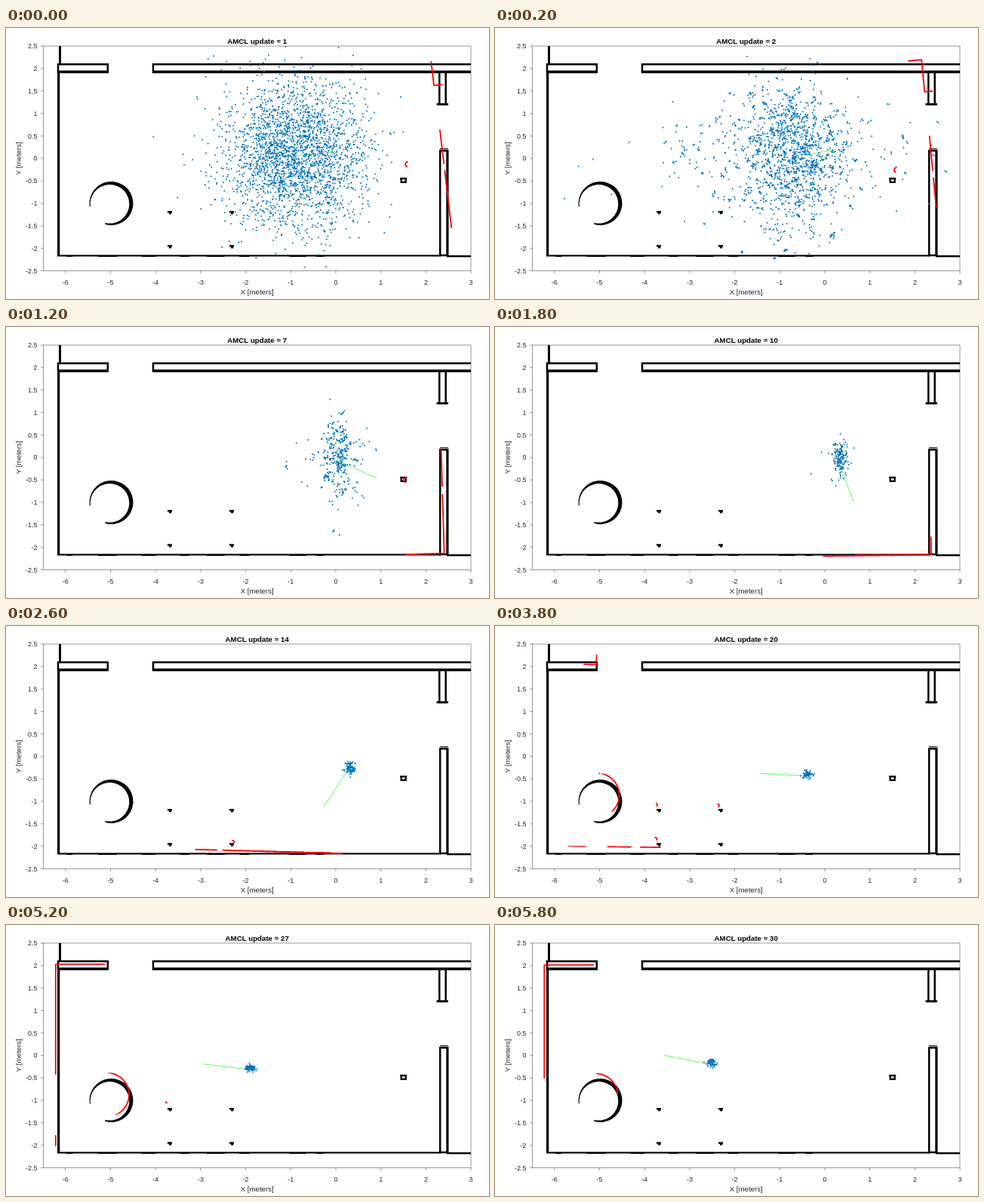
These frames come from a looping animation (640 px wide and 360 px high, 6 s). An HTML page with a canvas:

```html
<!DOCTYPE html>
<html lang="en">
<head>
<meta charset="utf-8">
<title>AMCL update</title>
<style>
  html, body { margin: 0; width: 100%; height: 100%; overflow: hidden; background: #fff; }
  canvas { display: block; width: 640px; height: 360px; }
</style>
</head>
<body>
<canvas id="stage" width="640" height="360"></canvas>
<script>
const ctx = document.getElementById('stage').getContext('2d');
const FONT = '"Liberation Sans", Arial, sans-serif';
const STEP = 200, STEPS = 30;
const METRE = 59.7, RAD = Math.PI / 180;
const FOV = 29.3, RAYS = 480, RANGE = 5.5 * METRE;
const BOX = { x: 49.5, y: 24, w: 566.5, h: 298.5 };
const toX = m => 437 + METRE * m;
const toY = m => 173.3 - METRE * m;

// hollow walls as x, y, width, height along the middle of their outline
const LINE = 2.5;
const stub = [69, 48.2, 65.8, 10.2];
const beam = [195, 48.2, 440, 10.2];
const pillar = [574.3, 58.4, 8.4, 42.8];
const post = [575.2, 163, 9.6, 139];
const leftWall = [68, 58, 3.3, 245];
const floor = [68, 301.4, 508, 2.1];

const ring = { x: 139.5, y: 233, r: 29 };
const crate = { x: 526.7, y: 202.4, r: 3.5 };
const legs = [[217, 245], [299, 245], [217, 290.3], [299, 290.3]]
  .map(([x, y]) => ({ x, y, r: 2 }));

const grow = ([x, y, w, h]) => [x - LINE / 2, y - LINE / 2, w + LINE, h + LINE];
const blocks = [...[stub, beam, pillar, post].map(grow), leftWall, floor];
const rounds = [ring, crate, ...legs];

// waypoints: update, x, y, heading, heading error, offset of the true pose
const route = [
  [1, 380, 170, 5, 6.75, -3.7, 3.4],
  [4, 419, 176, 21, 2.7, -3.4, -4.5],
  [10, 454, 176.5, -69, 0.7, -2.5, -2.7],
  [14, 453, 191, -123, -1.6, -4, -1],
  [20, 411, 199, -183, -0.7, 3.5, 5],
  [27, 321, 192, -187, 0, 5.5, 7.5],
  [30, 283, 185, -191.5, 0, 6, 6.5]
];

function poseAt(u) {
  const i = Math.max(1, route.findIndex(p => p[0] >= u));
  const a = route[i - 1], b = route[i];
  const k = (u - a[0]) / (b[0] - a[0]);
  const [, x, y, heading, error, ox, oy] = a.map((v, j) => v + (b[j] - v) * k);
  return { x, y, heading, error, ox, oy };
}

function seeded(seed) {
  let s = seed * 7919 + 17;
  return () => {
    s = (s + 0x6D2B79F5) | 0;
    let t = Math.imul(s ^ (s >>> 15), 1 | s);
    t = (t + Math.imul(t ^ (t >>> 7), 61 | t)) ^ t;
    return ((t ^ (t >>> 14)) >>> 0) / 4294967296;
  };
}

function hitBlock(x, y, dx, dy, [bx, by, w, h]) {
  const x1 = (bx - x) / dx, x2 = (bx + w - x) / dx;
  const y1 = (by - y) / dy, y2 = (by + h - y) / dy;
  const near = Math.max(Math.min(x1, x2), Math.min(y1, y2));
  const far = Math.min(Math.max(x1, x2), Math.max(y1, y2));
  return near > 0 && near <= far ? near : Infinity;
}

function hitRound(x, y, dx, dy, c) {
  const ox = c.x - x, oy = c.y - y;
  const along = ox * dx + oy * dy;
  const rest = c.r ** 2 - (ox * ox + oy * oy - along * along);
  return along > 0 && rest >= 0 ? along - Math.sqrt(rest) : Infinity;
}

function cast(x, y, angle) {
  const dx = Math.cos(angle) || 1e-9, dy = -Math.sin(angle) || 1e-9;
  return Math.min(
    ...blocks.map(b => hitBlock(x, y, dx, dy, b)),
    ...rounds.map(c => hitRound(x, y, dx, dy, c))
  );
}

function dot(x, y, r) {
  ctx.moveTo(x + r, y);
  ctx.arc(x, y, r, 0, 2 * Math.PI);
}

function drawMap() {
  ctx.fillStyle = ctx.strokeStyle = '#000';
  ctx.lineWidth = LINE;
  for (const w of [stub, beam, pillar, post]) ctx.strokeRect(...w);
  for (const [x, , w] of [stub, beam]) ctx.fillRect(x - 1, 56.5, w + 2, 3.6);
  ctx.fillRect(...leftWall);
  ctx.fillRect(...floor);
  ctx.fillRect(70, 24, 3, 25);
  ctx.fillRect(570.5, 100, 15.5, 2.6);
  ctx.fillRect(575, 160, 11, 1);
  ctx.fillRect(583.5, 162, 3, 141);
  ctx.fillRect(584, 302, 32, 2.4);

  // worn lower edge
  const rnd = seeded(5);
  for (let x = 80; x < 440; x += 30 + rnd() * 40) ctx.fillRect(x, 303, 6 + rnd() * 20, 1);

  ctx.beginPath();
  ctx.arc(ring.x, ring.y, ring.r, 172 * RAD, 465 * RAD);
  ctx.arc(ring.x - 2, ring.y + 0.8, 25.8, 465 * RAD, 172 * RAD, true);
  ctx.fill();

  for (const { x, y } of legs) {
    ctx.fillRect(x - 3, y - 2, 6, 2.4);
    ctx.fillRect(x - 1, y, 3.2, 2.3);
  }
  ctx.lineWidth = 2.3;
  ctx.strokeRect(crate.x - 3, crate.y - 2.4, 6, 4.8);
  ctx.fillRect(crate.x - 4.5, crate.y - 3.5, 9, 2);
}

function drawAxes() {
  const right = BOX.x + BOX.w, bottom = BOX.y + BOX.h, len = 3.5;
  ctx.strokeStyle = '#6a6a6a';
  ctx.lineWidth = 0.7;
  ctx.strokeRect(BOX.x, BOX.y, BOX.w, BOX.h);
  ctx.fillStyle = '#262626';
  ctx.font = '9px ' + FONT;
  ctx.textBaseline = 'middle';
  ctx.beginPath();
  ctx.textAlign = 'center';
  for (let m = -6; m <= 3; m++) {
    const x = toX(m);
    ctx.moveTo(x, bottom);
    ctx.lineTo(x, bottom + len);
    ctx.fillText(m, x, 338.5);
  }
  ctx.textAlign = 'right';
  for (let m = -2.5; m <= 2.5; m += 0.5) {
    const y = toY(m);
    ctx.moveTo(BOX.x, y);
    ctx.lineTo(BOX.x - len, y);
    ctx.fillText(m, 41.5, y + 0.7);
  }
  ctx.stroke();

  ctx.textAlign = 'center';
  ctx.font = '9.7px ' + FONT;
  ctx.fillText('X [meters]', 332.7, 351.5);
  ctx.save();
  ctx.translate(17.5, 173.3);
  ctx.rotate(-Math.PI / 2);
  ctx.fillText('Y [meters]', 0, 0);
  ctx.restore();
}

// the cloud shrinks with every update; resampling leaves clumps and strays for a while
function drawCloud(u, pose) {
  const age = u - 1;
  const fade = Math.exp(-0.36 * age);
  const bump = (age / 3 * Math.exp(1 - age / 3)) ** 2;
  const count = 70 + 2450 * fade;
  const sx = 3.3 + 44 * fade;
  const sy = 2.1 + 47 * Math.exp(-((age / 7.5) ** 2));
  const rnd = seeded(u);
  const gauss = () => Math.sqrt(-2 * Math.log(1 - rnd())) * Math.cos(2 * Math.PI * rnd());
  ctx.fillStyle = '#0072bd';
  ctx.beginPath();
  let cx, cy;
  for (let i = 0; i < count; i++) {
    if (i === 0 || rnd() < 1 / (1 + 1.2 * bump)) {
      const stray = rnd() < 0.33 * bump;
      cx = pose.x + 3 + gauss() * sx * (stray ? 3 : 1) - (stray ? sx : 0);
      cy = pose.y - 2 + gauss() * sy * (stray ? 0.7 : 1);
    }
    dot(cx + gauss() * 1.3, cy + gauss() * 1.1, 1);
  }
  ctx.fill();
}

function drawScan({ x, y, heading, error, ox, oy }) {
  ctx.fillStyle = '#f00';
  ctx.beginPath();
  for (let i = 0; i <= RAYS; i++) {
    const a = heading - FOV + 2 * FOV * i / RAYS;
    const d = cast(x + ox, y + oy, (a - error) * RAD);
    if (d < RANGE) dot(x + d * Math.cos(a * RAD), y - d * Math.sin(a * RAD), 0.95);
  }
  ctx.fill();
}

function drawHeading({ x, y, heading }) {
  ctx.strokeStyle = '#2cf52c';
  ctx.lineWidth = 0.75;
  ctx.beginPath();
  ctx.moveTo(x, y);
  ctx.lineTo(x + METRE * Math.cos(heading * RAD), y - METRE * Math.sin(heading * RAD));
  ctx.stroke();
}

function draw(u) {
  const pose = poseAt(u);
  ctx.fillStyle = '#fff';
  ctx.fillRect(0, 0, 640, 360);
  drawAxes();
  ctx.save();
  ctx.beginPath();
  ctx.rect(BOX.x, BOX.y, BOX.w, BOX.h);
  ctx.clip();
  drawMap();
  drawHeading(pose);
  drawCloud(u, pose);
  drawScan(pose);
  ctx.restore();
  ctx.fillStyle = '#000';
  ctx.font = 'bold 9.7px ' + FONT;
  ctx.textAlign = 'center';
  ctx.textBaseline = 'alphabetic';
  ctx.fillText('AMCL update = ' + u, 332.7, 20.5);
}

const start = performance.now();
let shown = 0;
function tick() {
  const u = Math.floor((performance.now() - start) / STEP) % STEPS + 1;
  if (u !== shown) draw(shown = u);
  requestAnimationFrame(tick);
}
tick();
</script>
</body>
</html>
```
